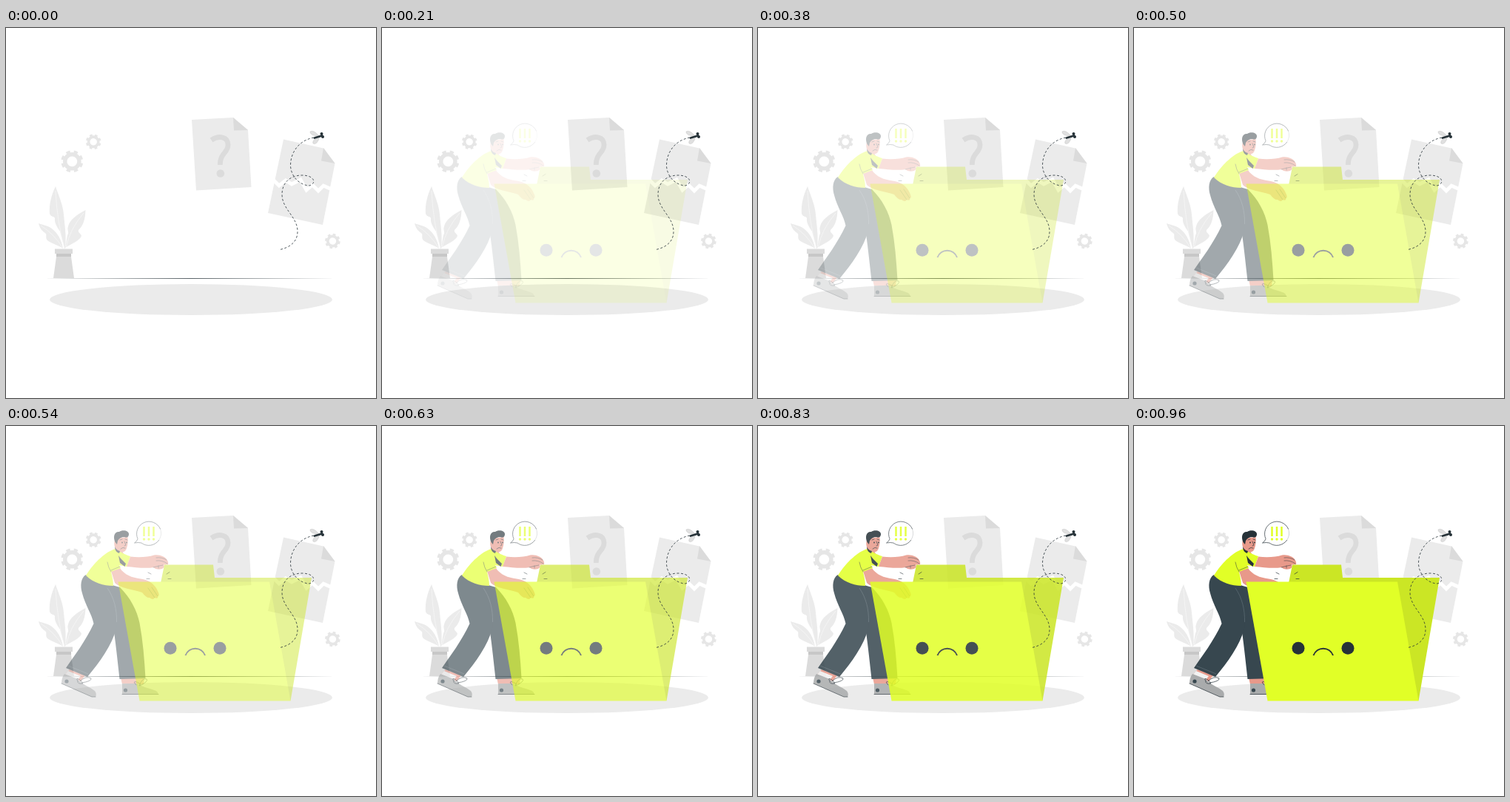
These frames come from a looping animation (500x500 px, 1 s). An HTML page without scripts:

```html
<!DOCTYPE html>
<html lang="en">
<head>
<meta charset="utf-8">
<title>Missing folder</title>
<style>
  html, body { margin: 0; width: 100%; height: 100%; overflow: hidden; background: #fff; }
  svg { display: block; width: 100%; height: 100%; }
  .fade { animation: fade 1s infinite; }
  /* 24 ticks per loop */
  @keyframes fade {
    0%, 4.167% { opacity: 0; animation-timing-function: steps(4); }
    20.833% { opacity: .12; animation-timing-function: steps(4); }
    37.5% { opacity: .295; animation-timing-function: steps(3); }
    50% { opacity: .47; animation-timing-function: steps(3); }
    62.5% { opacity: .64; animation-timing-function: steps(3); }
    75% { opacity: .81; animation-timing-function: steps(3); }
    87.5% { opacity: .95; animation-timing-function: steps(2); }
    95.833%, 100% { opacity: 1; }
  }
  .pale { fill: #ebebeb; }
  .grey { fill: #dbdbdb; }
  .ink { fill: #263238; }
  .pants { fill: #37474f; }
  .lime { fill: #e1ff27; }
  .dim { fill: #cbe625; }
  .skin { fill: #e8998a; }
  .shoe { fill: #a9abac; }
  .line { fill: none; stroke: #263238; stroke-width: .7; stroke-linecap: round; stroke-linejoin: round; }
  .fine { stroke-width: .5; }
  .rib { fill: none; stroke: #fafafa; stroke-width: .6; }
  .gear { fill: none; stroke: #e6e6e6; }
</style>
</head>
<body>
<svg viewBox="0 0 500 500">
  <defs>
    <g id="gear" class="gear">
      <circle r="9.6" stroke-width="5.4"/>
      <circle r="13" stroke-width="4" pathLength="16" stroke-dasharray="1.05 .95"/>
    </g>
  </defs>

  <use href="#gear" transform="translate(89.3 180.3) rotate(10)"/>
  <use href="#gear" transform="translate(118.2 153.8) rotate(12) scale(.69)"/>
  <use href="#gear" transform="translate(441.4 288) rotate(2) scale(.69)"/>

  <g id="question">
    <path class="pale" d="M251 124L307 121L327 138L331.5 215L257 219.5Z"/>
    <path class="grey" d="M307 121L308 138.5L327 138Z"/>
    <path d="M277.5 151.5C288 144.5 300 147 300 158C300 169 289 169 289.3 185" fill="none" stroke="#dbdbdb" stroke-width="6.8"/>
    <circle class="grey" cx="289.8" cy="196.5" r="5.3"/>
  </g>

  <g id="torn">
    <path class="pale" d="M375 150.5L429 162.5L444.5 183L428 266L354 250Z"/>
    <path class="grey" d="M429 162L426 179.5L444.5 183Z"/>
    <path d="M361 205L369 213L378 206L386 211L398 205L406 219L414 212L422 220L429 213L440 218" fill="none" stroke="#fff" stroke-width="4.8"/>
  </g>

  <ellipse class="pale" cx="250" cy="367" rx="191" ry="21"/>
  <path class="ink" d="M51 338.3L250 337.95L446 338.3L250 338.65Z"/>

  <g id="plant">
    <path class="pale" d="M67 214C61 226 58 240 59 251C61 256 65 254 66 257C65 264 70 270 73 275L79 298H80C82 280 79 265 78 252C77 238 70 224 67 214Z"/>
    <path class="pale" d="M107.5 246C94 253 86 260 84 268C82 273 86 276 83 280L80 297C88 292 100 287 102 281C101 277 97 277 98 273C104 267 107 260 107.5 246Z"/>
    <path class="pale" d="M44 264C46 272 50 275 54 278C55 281 53 284 56 287C61 291 70 293 77 298C75 285 69 277 63 272C57 267 52 267 44 264Z"/>
    <path class="rib" d="M67 220Q69 262 79 298M105 250Q86 272 81 297M47 267Q66 279 77 298"/>
    <path class="grey" d="M66 298.5H90V305H66ZM68 309H88L92 338H64Z"/>
    <path d="M68 305H88V309H68Z" fill="#c7c7c7"/>
  </g>

  <g class="fade" id="man">
    <path class="skin" d="M155 340H187L186 349H157Z"/>
    <path class="shoe" d="M157 348H177C184 353 194 354 203 358Q206 360 206 363H157Z"/>
    <path class="line" d="M157 362.5H206M176 350Q170 344 177 346Q184 349 180 351Q184 340 190 342Q193 345 181 351"/>
    <circle class="pants" cx="161.5" cy="357" r="2.6"/>
    <path class="pants" d="M140 214L154 218C168 232 177 249 180.5 266C185 290 187 315 188.5 341L153.5 342C151 320 149 300 146 278Z"/>

    <path class="skin" d="M86 329L107 337L101 345L80 336Z"/>
    <path d="M84 331L101 338L97 343L80 336Z" fill="#f2f2f2"/>
    <path class="shoe" d="M79 335L97 342C103 350 113 352 120 358Q123 362 121 366L116 366L75 348Q75 340 79 335Z"/>
    <path class="line" d="M75 348L116 366H121M97 345Q93 338 101 344L104 348Q96 349 97 345M100 345Q108 337 115 341Q116 345 102 347"/>
    <circle class="pants" cx="82" cy="345" r="2.6"/>
    <path class="pants" d="M108 201C101 205 100 216 103 226C107 242 116 254 118.5 267C108 290 92 311 81 327L110 339C127 319 143 296 149 274C152 260 148 238 146 216Z"/>
    <path d="M84 324L111 335M137 219C146 232 150 248 149.5 265" fill="none" stroke="#66757d" stroke-width=".6"/>

    <path class="skin" d="M142 196L154 192C160 201 170 205 182 206.5C193 208 199 213 203 219C207 226 208 230 205 230Q206 234 201 232Q199 236 194 232Q190 233 184 225C172 221 154 219 147 212Z"/>
    <path class="line fine" d="M192 219L201 232M197 218L205 230"/>

    <path class="skin" d="M148 160L147 171L153 181L162 180L157 168Z"/>
    <path class="lime" d="M148 166C136 169 119 184 108 202C118 212 132 216 145 216C145 208 143 202 142 197L155 192L153 188L163 190L168 176C161 174 156 171 148 166Z"/>
    <path class="ink" d="M152 175L155 179L162 186L160.5 190L154 185Z"/>
    <path class="line fine" d="M142 197Q138 191 137 184M142 195L154 190"/>

    <path class="skin" d="M148 152C145 157 146 165 150 168Q156 172 161 169Q165.500 163 164.5 150Z"/>
    <path class="ink" d="M147.5 157C144 149 147 142 153 143C157 140 167 141 166 147Q165 152 160 150Q154 150 151 155L150 160Z"/>
    <path class="ink" d="M147 163Q149 168 154 169L153 172Q147 170 147 163Z"/>
    <path class="line" d="M154 154L157 153M161 153L164 154M160 156L162 161L160 162M155 166Q158 163 161 165"/>
    <circle class="ink" cx="157" cy="157.5" r=".9"/>
    <circle class="ink" cx="163" cy="157.5" r=".9"/>

    <path d="M178 153A16.5 16.5 0 1 1 183 158Q178 156 173.5 158Q177 156 178 153Z" fill="#fff"/>
    <path class="line" d="M208.5 139A16.5 16.5 0 0 0 178 152.5Q177 156 173.5 158Q179 157 183 158A16.5 16.5 0 0 0 206.500 154.5"/>
    <path class="line" d="M208.5 139A16.5 16.5 0 0 1 206.5 154.5" opacity=".3"/>
    <path d="M186.5 136V149M193 136V149M199.5 136V149" fill="none" stroke="#e1ff27" stroke-width="2.5"/>
    <g class="lime">
      <circle cx="186.5" cy="153" r="1.7"/>
      <circle cx="193" cy="153" r="1.7"/>
      <circle cx="199.5" cy="153" r="1.7"/>
    </g>
  </g>

  <g class="fade" id="folder">
    <path class="dim" d="M209 212L214 187.5H280L282 205H413L384.5 371.5L300 212Z"/>
    <path class="lime" d="M151.5 210.5H356L384.5 371.5H180.5Z"/>
    <circle class="ink" cx="222" cy="300.3" r="8.5"/>
    <circle class="ink" cx="289" cy="300.3" r="8.5"/>
    <path d="M242.5 310C247 297.500 264.500 297.500 269 310" fill="none" stroke="#263238" stroke-width="2"/>
  </g>

  <g class="fade" id="arm">
    <path class="skin" d="M168 176.5C180 178 192 177 200 174.5C208 173 215 177 217 180Q220 184 219 187L213 187.5Q215 191 211 193Q203 195 199 191C189 193 175 191 163 190Z"/>
    <path class="line fine" d="M203 178Q211 177 217 181M203 182Q211 181 218 186M199 191Q206 189 212 188M206 189V192"/>
    <path class="line" d="M190 206.5H194M192 198L196 200M217 200L221 197.5M219 206.5H223"/>
  </g>

  <g id="fly">
    <path d="M416 148C395 152 384 169 384.5 187C386 204 400 213 410 213C420 210 417 199 400 199C385 199 373 208 373 225C373 245 394 255 394 275C394 290 382 297 370 299.5" fill="none" stroke="#263238" stroke-width=".8" stroke-dasharray="3 2.5"/>
    <path d="M424 147Q416 137 411 140Q410 145 424 147ZM424 147Q413 151 415 156Q420 159 424 147Z" fill="#e0e0e0" stroke="#c4c4c4" stroke-width=".5"/>
    <path d="M417 148.5L427 145.5" fill="none" stroke="#263238" stroke-width="2.8" stroke-linecap="round"/>
    <circle class="ink" cx="426.5" cy="143" r="2"/>
    <circle class="ink" cx="428" cy="147" r="2"/>
  </g>
</svg>
</body>
</html>
```
